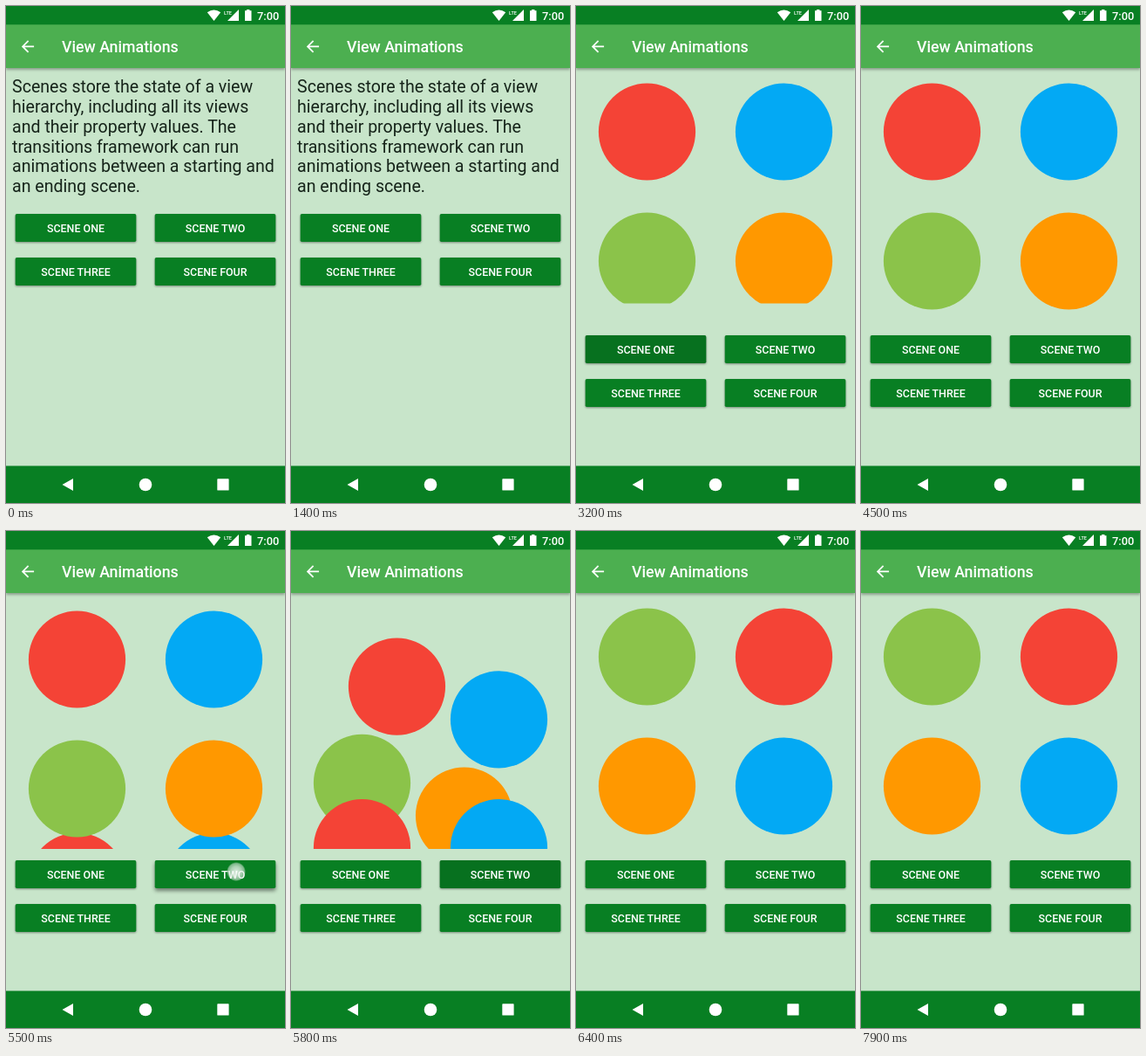
An HTML page that plays this animation: 320 by 569 pixels, repeating every 8000 ms.

```html
<!DOCTYPE html>
<html lang="en">
<head>
<meta charset="utf-8">
<title>View Animations</title>
<style>
  html, body { margin: 0; width: 100%; height: 100%; overflow: hidden; background: #c8e5ca; }
  svg { display: block; width: 100vw; height: 100vh; font-family: Roboto, sans-serif; }
  .dark { fill: #087f23; }
  .white { fill: #fff; }
  .medium { font-weight: 500; fill: #fff; }
  .appbar { fill: #4caf50; filter: drop-shadow(0 2px 1.8px rgba(0, 0, 0, .3)); }
  .button { filter: drop-shadow(0 1px .8px rgba(0, 0, 0, .4)); }
  .button.pressed { filter: drop-shadow(0 3px 2.2px rgba(0, 0, 0, .45)); }
</style>
</head>
<body>
<svg id="stage" viewBox="0 0 320 569" preserveAspectRatio="none">
  <defs>
    <clipPath id="sceneClip"><rect id="sceneBox" y="71" width="320" height="293"/></clipPath>
    <radialGradient id="touchFill">
      <stop offset="0" stop-color="#fff" stop-opacity=".85"/>
      <stop offset=".55" stop-color="#eef3ee" stop-opacity=".72"/>
      <stop offset=".85" stop-color="#dfe9e0" stop-opacity=".55"/>
      <stop offset="1" stop-color="#dfe9e0" stop-opacity="0"/>
    </radialGradient>
  </defs>
  <rect width="320" height="569" fill="#c8e5ca"/>
  <g id="intro" font-size="19.56" fill="#16241a"></g>
  <g id="circles" clip-path="url(#sceneClip)"><g id="strays"></g></g>
  <g id="buttons"></g>
  <circle id="touch" r="11" fill="url(#touchFill)"/>

  <rect class="appbar" y="20" width="320" height="51"/>
  <rect class="dark" width="320" height="21.3"/>
  <path class="white" transform="translate(14.3 35.8) scale(.889)"
    d="M20 11H7.83l5.59-5.59L12 4l-8 8 8 8 1.41-1.41L7.83 13H20z"/>
  <text class="medium" x="64" y="53.2" font-size="17.78">View Animations</text>

  <path class="white" d="M238.5 17 230.8 7.2Q238.5 1.8 246.2 7.2Z"/>
  <path class="white" d="M254 17 267 4V17Z"/>
  <text class="medium" x="250" y="9.6" font-size="5.6">LTE</text>
  <path class="white" d="M274 5.3H276V4H279.4V5.3H281.5V17H274Z"/>
  <text class="medium" x="288" y="15.5" font-size="12.8">7:00</text>

  <rect class="dark" y="526.5" width="320" height="43"/>
  <path class="white" d="M64.5 548 77 541V555Z"/>
  <circle class="white" cx="160" cy="548" r="7.3"/>
  <rect class="white" x="242.3" y="541.3" width="13.3" height="13.3" rx=".7"/>
</svg>
<script>
const LOOP = 8000;
const SCENE_ONE = 3100, SCENE_TWO = 5700;
const LEFT = 81.5, RIGHT = 238.5, TOP = 144, BOTTOM = 292, RADIUS = 55.6;
const RED = '#f44336', BLUE = '#03a9f4', GREEN = '#8bc34a', ORANGE = '#ff9800';

const $ = id => document.getElementById(id);
const clamp = v => Math.max(0, Math.min(1, v));
const mix = (a, b, p) => a + (b - a) * p;
const ease = v => .5 - Math.cos(clamp(v) * Math.PI) / 2;

function set(node, attrs) {
  for (const name in attrs) node.setAttribute(name, attrs[name]);
  return node;
}
function add(parent, tag, attrs, text = '') {
  const node = set(document.createElementNS('http://www.w3.org/2000/svg', tag), attrs);
  node.textContent = text;
  return parent.appendChild(node);
}

['Scenes store the state of a view', 'hierarchy, including all its views',
 'and their property values. The', 'transitions framework can run',
 'animations between a starting and', 'an ending scene.'
].forEach((line, i) => add($('intro'), 'text', { x: 7.1, y: 98.8 + i * 22.9 }, line));

const buttons = ['SCENE ONE', 'SCENE TWO', 'SCENE THREE', 'SCENE FOUR'].map((label, i) => {
  const x = 10.7 + (i % 2) * 160, y = 238 + (i >> 1) * 50;
  const box = { x, y, width: 138.6, height: 32, rx: 1.8 };
  const g = add($('buttons'), 'g', {});
  const body = add(g, 'rect', { ...box, class: 'dark button' });
  const ripple = add(g, 'rect', { ...box, opacity: 0 });
  add(g, 'text', { x: x + 69.3, y: y + 20.9, class: 'medium', 'font-size': 12.44, 'text-anchor': 'middle' }, label);
  return { body, ripple };
});

// Each circle has a place in the first scene and one in the second.
const circles = [
  { fill: GREEN, from: [LEFT, BOTTOM], to: [LEFT, TOP] },
  { fill: ORANGE, from: [RIGHT, BOTTOM], to: [LEFT, BOTTOM] },
  { fill: RED, from: [LEFT, TOP], to: [RIGHT, TOP] },
  { fill: BLUE, from: [RIGHT, TOP], to: [RIGHT, BOTTOM] }
].map(c => ({ ...c, node: add($('circles'), 'circle', { r: RADIUS, fill: c.fill }) }));

const strays = [[LEFT, RED], [RIGHT, BLUE]].map(([cx, fill]) =>
  add($('strays'), 'circle', { cx, r: RADIUS, fill }));

const show = (id, visible) => { $(id).style.display = visible ? '' : 'none'; };

function drawCircles(t) {
  const p = ease((t - SCENE_TWO) / 300);
  const sag = t < SCENE_TWO - 200 ? 0 : 3 * (1 - p) + 168 * p * (1 - p);
  for (const { node, from, to } of circles)
    set(node, { cx: mix(from[0], to[0], p), cy: mix(from[1], to[1], p) + sag });

  show('strays', t >= SCENE_TWO - 200 && p < 1);
  strays.forEach(node => set(node, { cy: 401 - 151 * p }));
  if (t < SCENE_TWO) $('circles').prepend($('strays'));
  else $('circles').append($('strays'));

  const bottom = mix(225, 364, ease((t - SCENE_ONE + 118) / 300));
  set($('sceneBox'), { height: bottom - 71 });
}

function drawTouch(t) {
  const second = t > 4000;
  const change = second ? SCENE_TWO : SCENE_ONE;
  const start = change - 800;
  show('touch', t >= start && t < change);
  set($('touch'), { cx: second ? 264 : 106, cy: second ? 390 : 254.5, opacity: clamp((t - start + 80) / 250) });
}

function drawButtons(t) {
  set($('buttons'), { transform: `translate(0 ${t < SCENE_ONE ? 0 : 139})` });
  [SCENE_ONE, SCENE_TWO].forEach((change, i) => {
    const since = t - change;
    buttons[i].body.classList.toggle('pressed', since >= -300 && since < 0);
    set(buttons[i].ripple, { opacity: since < 0 ? 0 : .13 * clamp(1 - since / 650) });
  });
}

function draw(now) {
  const t = now % LOOP;
  show('intro', t < SCENE_ONE);
  show('circles', t >= SCENE_ONE);
  drawCircles(t);
  drawTouch(t);
  drawButtons(t);
  requestAnimationFrame(draw);
}
draw(performance.now());
</script>
</body>
</html>
```
